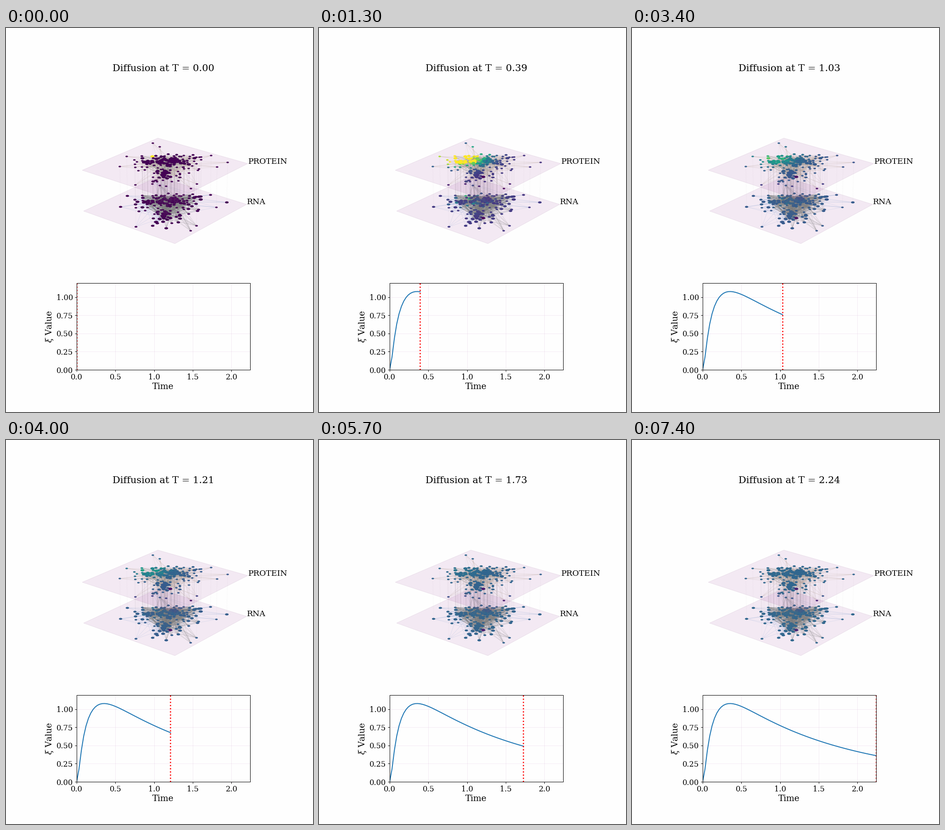
A matplotlib script that plays this animation: 669x837 px, repeating every 7500 ms.

```python
import numpy as np
import matplotlib.pyplot as plt
from matplotlib.animation import FuncAnimation
from matplotlib.collections import EllipseCollection, LineCollection

W, H, DPI = 669, 837, 64
N, STEP = 75, 0.0303
PT = 72 / DPI  # points per pixel
T = np.arange(N) * STEP
rng = np.random.default_rng(11)

plt.rcParams.update({"font.family": "DejaVu Serif",
                     "mathtext.fontset": "dejavuserif"})

# ---- network -------------------------------------------------------------
SOURCE = (319, 280)
# The most remote nodes; the last two barely take part in the diffusion.
REMOTE = [(320, 251), (335, 259), (263, 280), (248, 302), (282, 342),
          (319, 340), (349, 345), (416, 340), (447, 278), (460, 303),
          (483, 293), (403, 350), (358, 324.5)]


def cluster(n, center, spread, low, high):
    return np.clip(rng.normal(center, spread, (n, 2)), low, high)


def ring(n):
    """Scatter nodes along the lower rim of the core."""
    a = rng.uniform(-0.4, np.pi + 0.4, n)
    return np.column_stack([350 + np.cos(a) * rng.uniform(50, 88, n),
                            292 + np.sin(a) * rng.uniform(22, 46, n)])


core = np.vstack([[SOURCE],
                  cluster(112, (351, 290), (28, 7.5), (296, 275), (414, 307)),
                  cluster(28, (344, 318), (9, 6.5), (328, 308), (362, 328))])
top = np.vstack([core, ring(40), REMOTE])
n_core, n_all = len(core), len(top)
is_outer = np.arange(n_all) >= n_core


def lower(p):
    """Map points of the upper plane to the lower plane."""
    x, y = p.T
    return np.column_stack([363 + (x - 363) * 0.985,
                            y + 86 + (y - 280) * 0.085])


bottom = lower(top)
spread = rng.random(n_all) ** 2
size_top = np.where(is_outer, 5.6, 5.4 + 4.6 * spread)
size_bot = np.where(is_outer, rng.uniform(5.5, 9.5, n_all), 5.4 + 4 * spread)
size_top[[0, -1]] = size_bot[-1] = 9


def links(nodes, k_outer, n_inner):
    """Outer nodes reach into the core; core nodes pair up at random."""
    outer = [(nodes[i], nodes[j]) for i in range(n_core, n_all)
             for j in rng.choice(n_core, k_outer, replace=False)]
    inner = nodes[rng.integers(0, n_core, (n_inner, 2))]
    return np.array(outer), inner


# ---- diffusion -----------------------------------------------------------
start = np.zeros(n_all)
start[0] = 1
dist = np.hypot(top[:, 0] - 305, 2.6 * (top[:, 1] - 280))
peak_top = (5.4 * np.exp(-(dist / 46) ** 1.7)
            * np.exp(rng.normal(0, 0.2, n_all)))
peak_bot = peak_top * 0.6 * rng.random(n_all) ** 4

rate_top = np.where(top[:, 1] > 338, 0.7, rng.uniform(1.4, 1.8, n_all))
rate_bot = rng.uniform(1.6, 2.0, n_all)
rate_top[-2:] = 0.15
rate_bot[-1] = 0.15


def level(t, rate, peak, start=0):
    fast, slow = np.exp(-8 * t), np.exp(-2.5 * t)
    return 0.335 * (1 - np.exp(-rate * t)) + peak * (slow - fast) + start * fast


def xi(t):
    return (0.05 + 1.441 * np.exp(-0.685 * t) - 1.491 * np.exp(-7.6 * t)
            - 11 * t * np.exp(-t / 0.025))


# ---- stage ---------------------------------------------------------------
fig = plt.figure(figsize=(W / DPI, H / DPI), dpi=DPI, facecolor="#fefefe")
stage = fig.add_axes([0, 0, 1, 1])
stage.set(xlim=(0, W), ylim=(H, 0))
stage.axis("off")


def label(x, y, text, px, **kw):
    return stage.text(x, y, text, fontsize=px * PT, va="baseline", **kw)


def plane(corners, z):
    stage.fill(*np.transpose(corners), facecolor=(0.5, 0, 0.5, 0.082),
               edgecolor=(0.5, 0.3, 0.5, 0.12), lw=0.9 * PT, zorder=z)


def strokes(segs, color, alpha, z, width=0.8, style="solid"):
    stage.add_collection(LineCollection(
        segs, colors=color, alpha=alpha, linewidths=width * PT,
        linestyles=style, zorder=z), autolim=False)


def dots(points, size, z):
    coll = EllipseCollection(size, size * 0.58, np.zeros(len(size)),
                             units="xy", offsets=points, cmap="viridis",
                             offset_transform=stage.transData,
                             linewidths=0, zorder=z)
    coll.set_clim(0, 1)
    stage.add_collection(coll, autolim=False)
    return coll


plane([(331, 324), (524.5, 384.5), (368, 470), (169, 399)], 1)
outer, inner = links(bottom, 9, 420)
far = (outer[:, 0, 0] < 335) | (outer[:, 0, 0] > 425)
strokes(outer[far][::2], "#7f9fd0", 0.2, 2)
strokes(outer[~far], "#808080", 0.25, 2)
strokes(inner, "#808080", 0.4, 2, 1.0)
low_dots = dots(bottom, size_bot, 3)

pillars = np.stack([top, bottom], axis=1)
strokes(pillars[~is_outer], "#777777", 0.25, 4, 0.9, "dotted")
strokes(pillars[is_outer], "#777777", 0.12, 4, 0.9, "dotted")

plane([(331, 240), (527, 295.5), (368, 376), (166, 310)], 5)
outer, inner = links(top, 4, 260)
strokes(outer, "#a58f7c", 0.18, 6)
strokes(inner, "#8c8c86", 0.3, 6)
top_dots = dots(top, size_top, 7)

title = label(343.3, 94, "", 20.88, ha="center")
label(528, 296, "PROTEIN", 17.4)
label(525, 384, "RNA", 17.4)
label(342.5, 787, "Time", 18.56, ha="center")
label(99.7, 651, r"$\xi$ Value", 18.56, ha="center", rotation=90,
      rotation_mode="anchor")

# ---- chart ---------------------------------------------------------------
ax = fig.add_axes([154 / W, 1 - 745 / H, 378.3 / W, 189 / H])
ax.set(xlim=(0, T[-1]), ylim=(0, 1.196), facecolor="none",
       xticks=np.arange(0, 2.1, 0.5), yticks=np.arange(0, 1.1, 0.25))
ax.xaxis.set_major_formatter("{x:.1f}")
ax.yaxis.set_major_formatter("{x:.2f}")
ax.tick_params(labelsize=16.24 * PT, length=4 * PT, width=0.93 * PT,
               pad=4 * PT)
ax.grid(color="purple", alpha=0.08, lw=0.93 * PT)
for spine in ax.spines.values():
    spine.set_linewidth(PT)
curve, = ax.plot([], [], color="#1f77b4", lw=2 * PT)
cursor = ax.axvline(0, color="red", ls=":", lw=2.6 * PT)


def draw(i):
    t = T[i]
    top_dots.set_array(level(t, rate_top, peak_top, start))
    low_dots.set_array(level(t, rate_bot, peak_bot))
    title.set_text(f"Diffusion at T = {t:.2f}")
    curve.set_data(T[:i + 1], xi(T[:i + 1]))
    cursor.set_xdata([t, t])
    return top_dots, low_dots, title, curve, cursor


anim = FuncAnimation(fig, draw, frames=N, interval=100, repeat=True,
                     repeat_delay=0, blit=False)
plt.show()
```
